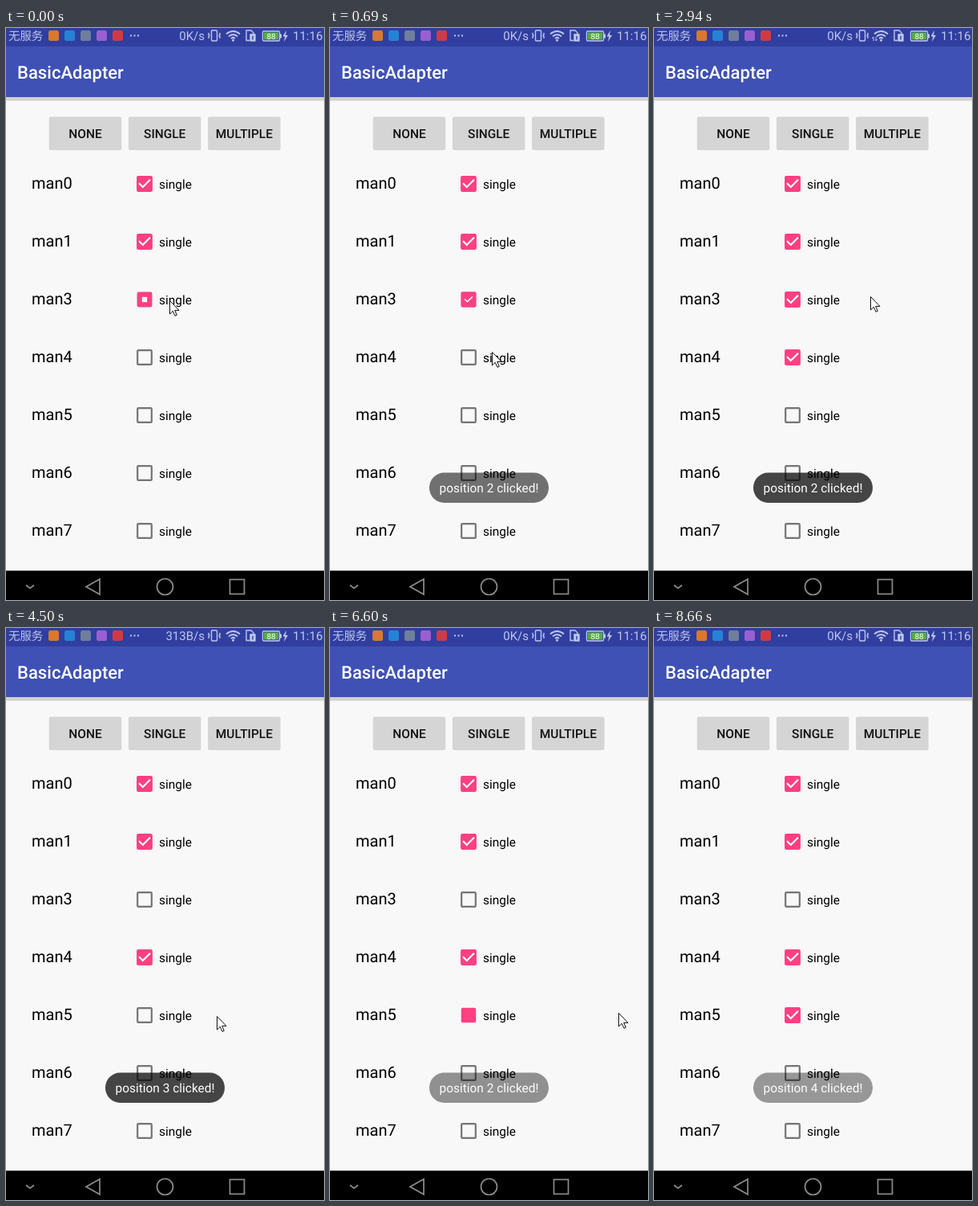
Write an HTML page that moves like this. It is 397x712 px and loops after 8.76 s.

```html
<!DOCTYPE html>
<html lang="en">
<head>
<meta charset="utf-8">
<title>BasicAdapter</title>
<style>
html, body { margin: 0; width: 100%; height: 100%; overflow: hidden; background: #f8f8f8; }
svg { display: block; width: 397px; height: 712px; font-family: Roboto, sans-serif; text-rendering: geometricPrecision; }
.medium { font-weight: 500; }
.status { fill: #bfc6ea; font-size: 15px; }
.icon { fill: none; stroke: #bfc6ea; stroke-width: 1.4; }
.nav { fill: none; stroke: #8c8c8c; stroke-width: 1.7; }
.body { font-size: 15.44px; }
</style>
</head>
<body>
<svg viewBox="0 0 397 712">
  <rect width="397" height="712" fill="#f8f8f8"/>
  <rect y="86" width="397" height="4.5" fill="#d2d1d0"/>
  <rect y="22" width="397" height="64" fill="#3f51b5"/>
  <rect width="397" height="23" fill="#303f9f"/>
  <text class="medium" x="14" y="63" font-size="22.06" fill="#fff">BasicAdapter</text>

  <g id="notices">
    <text class="status" x="3" y="15" style="font-family:'Noto Sans CJK SC','Noto Sans CJK',sans-serif;font-size:14.4px">无服务</text>
    <path d="M155 9.5h2m2.500 0h2m2.500 0h2" stroke="#bfc6ea" stroke-width="2"/>
  </g>
  <text class="status" id="speed" x="248" y="15" text-anchor="end"></text>
  <g class="icon">
    <rect x="256.5" y="3" width="7" height="13" rx="1"/>
    <path d="M253 6v2.5l1 1-1 1V13M267 6v2.5l-1 1 1 1V13"/>
    <path d="M275 7.5q8.5-7 17 0M278 10.5q5.5-4.5 11 0M281 13q2.5-2 5 0" stroke-width="1.8"/>
    <circle cx="283.5" cy="15.3" r=".8"/>
    <path id="traffic" d="M274 16v-5l-2 2M277 11v5l2-2" stroke-width="1"/>
    <path d="M304 15.500h-4V3h6l3 3v2"/>
    <path d="M305 8h6v8h-6z" fill="#bfc6ea"/>
    <path d="M308 10v4.500" stroke="#303f9f"/>
    <rect x="320.5" y="4" width="21" height="12" rx="1.5"/>
  </g>
  <rect x="322" y="5.5" width="18" height="9" fill="#58ad3f"/>
  <rect x="342" y="7.5" width="2" height="5" fill="#bfc6ea"/>
  <text x="331" y="13.5" font-size="10" text-anchor="middle" fill="#fff">88</text>
  <path d="M350 3l-4.500 7.500h2.800L347 17l5-8h-3z" fill="#bfc6ea"/>
  <text class="status" x="358" y="15">11:16</text>

  <g id="buttons"></g>
  <g id="rows"></g>

  <g id="toast">
    <rect x="124" y="553.5" width="149" height="37.5" rx="18.5" opacity=".72"/>
    <text id="message" class="body" x="198.5" y="578" text-anchor="middle" fill="#fff"></text>
  </g>
  <path id="cursor" d="M.5 .5V17L4.300 13.300L7 19.300L9.300 18.300L6.700 12.400H12Z" fill="#fff" stroke="#111"/>

  <rect y="675.5" width="397" height="37"/>
  <g class="nav">
    <path d="M25 693.5l5 4 5-4"/>
    <path d="M117 686v19l-17-9.500z"/>
    <circle cx="198.5" cy="695.5" r="10"/>
    <rect x="279.5" y="686.5" width="18" height="18"/>
  </g>
</svg>
<script>
const LOOP = 8760, STEP = 115;
const FADE = 250, CHECK_TIME = 1150;

// Each click toggles a row; its queued toast shows later
const CLICKS = [
  { row: 2, at: -300, toast: 500 },
  { row: 3, at: 1150, toast: 3480 },
  { row: 2, at: 3150, toast: 5000 },
  { row: 4, at: 5960, toast: 6700 }
];

// Cursor stops: arrival time, x, y
const STOPS = [[0, 204, 339], [650, 202, 403], [1900, 335, 509], [2850, 270, 334],
  [4400, 263, 483], [5050, 325, 596], [5600, 348, 556], [6700, 361, 470]];
const TRAVEL = .65, CURSOR_GONE = 6840;

const $ = id => document.getElementById(id);
const clamp = value => Math.max(0, Math.min(1, value));
const ease = p => p * p * (3 - 2 * p);
const between = (time, start, end) => time >= start && time < end;
const show = (id, visible) => $(id).setAttribute('visibility', visible ? 'visible' : 'hidden');

function add(parent, tag, attrs, text) {
  const node = document.createElementNS('http://www.w3.org/2000/svg', tag);
  for (const key in attrs) node.setAttribute(key, attrs[key]);
  if (text) node.textContent = text;
  return parent.appendChild(node);
}

['#d9782f', '#2583d6', '#6f7f99', '#9a5fd0', '#d03a45'].forEach((fill, i) =>
  add($('notices'), 'rect', { x: 53 + 20 * i, y: 3, width: 13, height: 13, rx: 2.5, fill }));

['NONE', 'SINGLE', 'MULTIPLE'].forEach((label, i) => {
  const x = 53.7 + 99.2 * i;
  add($('buttons'), 'rect', { x, y: 110.5, width: 90.5, height: 41.5, rx: 2, fill: '#d5d5d5' });
  add($('buttons'), 'text', { x: x + 45.3, y: 137, class: 'body medium', 'text-anchor': 'middle', fill: '#111' }, label);
});

const boxes = [0, 1, 3, 4, 5, 6, 7].map((number, i) => {
  const row = add($('rows'), 'g', { transform: `translate(0 ${194 + 72 * i})` });
  add(row, 'text', { x: 32, y: 6, 'font-size': 20 }, `man${number}`);
  add(row, 'text', { x: 191, y: 6, class: 'body' }, 'single');
  const box = add(row, 'g');
  return {
    box,
    frame: add(box, 'rect', { x: -9, y: -9, width: 18, height: 18, rx: 2 }),
    hole: add(box, 'path', { d: 'M-7-7H7V7H-7z', fill: '#f8f8f8' }),
    tick: add(box, 'path', { d: 'M-2 5l-5-5 1.410-1.410L-2 2.170l7.590-7.590L7-4z', fill: '#fff' })
  };
});

// 0 is empty, 1 is checked; the hole closes first, then the tick grows
function checkLevel(row, time) {
  const clicks = CLICKS.filter(click => click.row === row && click.at <= time);
  if (!clicks.length) return row < 2 ? 1 : 0;
  const progress = clamp((time - clicks.at(-1).at) / CHECK_TIME);
  return clicks.length % 2 ? progress : 1 - progress;
}

function drawBox({ box, frame, hole, tick }, level) {
  const size = 1.103 * (1 - .07 * Math.sin(Math.PI * level));
  box.setAttribute('transform', `translate(173 0) scale(${size})`);
  frame.setAttribute('fill', level ? '#ff4081' : '#757575');
  hole.setAttribute('transform', `scale(${level ? clamp(.9 - 1.8 * level) : 1})`);
  tick.setAttribute('transform', `scale(${clamp(2 * level - 1)})`);
}

function cursorAt(time) {
  const i = STOPS.findIndex(stop => stop[0] > time);
  if (i < 0) return STOPS.at(-1).slice(1);
  const [from, to] = [STOPS[i - 1], STOPS[i]];
  const part = ease(clamp(1 - (to[0] - time) / (to[0] - from[0]) / TRAVEL));
  return [1, 2].map(k => Math.round(from[k] + (to[k] - from[k]) * part));
}

function drawToast(time) {
  const current = CLICKS.findLast(click => click.toast <= time);
  show('toast', current);
  if (!current) return;
  const next = CLICKS[CLICKS.indexOf(current) + 1];
  const end = next ? next.toast : LOOP;
  $('toast').setAttribute('opacity', Math.min(1, (time - current.toast) / FADE, (end - time) / FADE));
  $('message').textContent = `position ${current.row} clicked!`;
}

function render(now) {
  const time = Math.floor(now / STEP) * STEP;
  boxes.forEach((box, row) => drawBox(box, checkLevel(row, time)));
  drawToast(time);
  $('cursor').setAttribute('transform', `translate(${cursorAt(time)})`);
  show('cursor', time < CURSOR_GONE);
  show('traffic', between(time, 1500, 3420));
  $('speed').textContent = between(time, 3840, 6480) ? '313B/s' : '0K/s';
}

const origin = performance.now();
function loop() {
  render((performance.now() - origin) % LOOP);
  requestAnimationFrame(loop);
}
loop();
</script>
</body>
</html>
```
